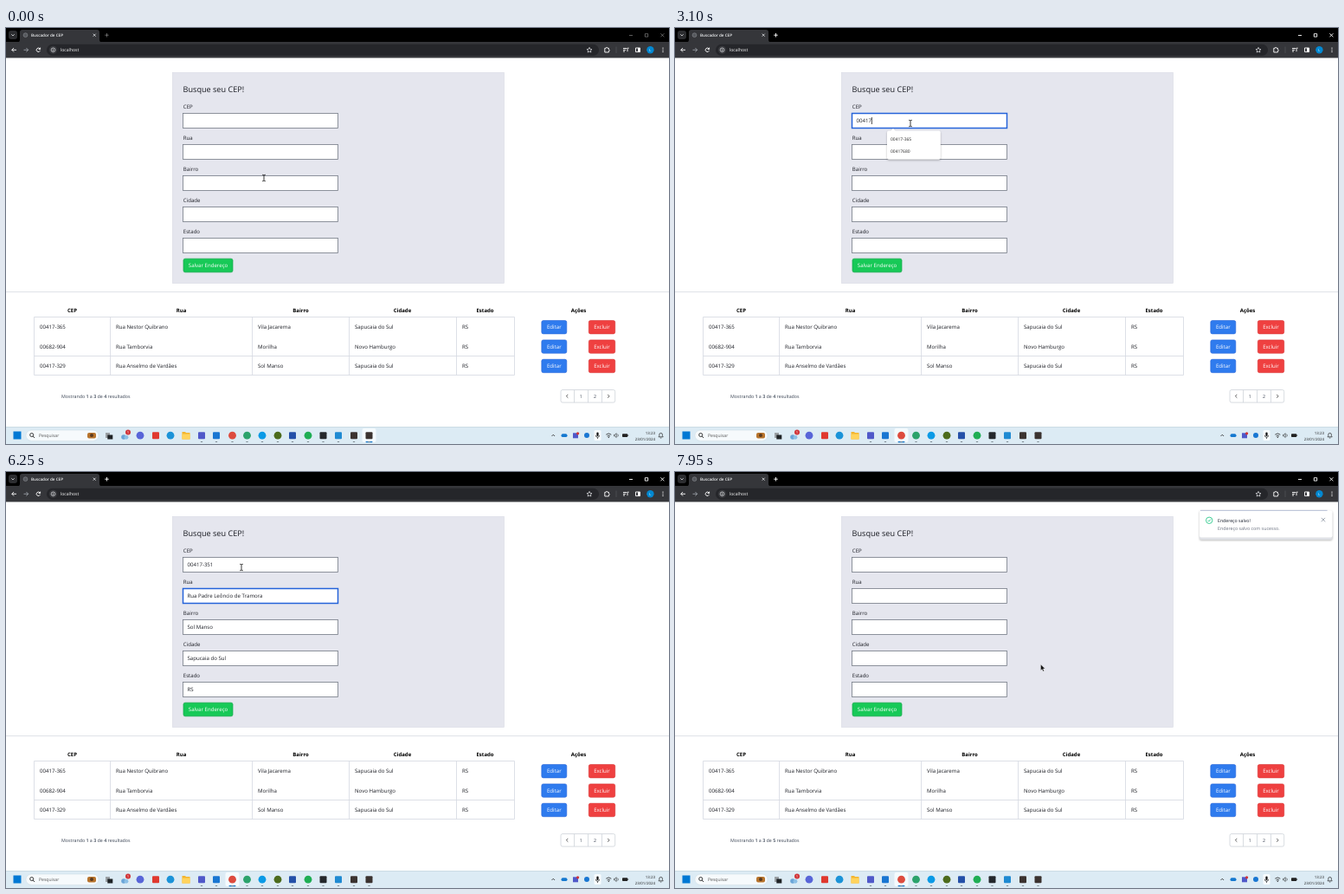
An HTML page for the animation above (8000 ms loop, 766 by 480 pixels).

```html
<!DOCTYPE html>
<html lang="pt-BR">
<head>
<meta charset="utf-8">
<title>Buscador de CEP</title>
<style>
html, body { margin: 0; width: 100%; height: 100%; overflow: hidden; background: #fff; }
svg { display: block; width: 766px; height: 480px; }
text { font-family: "Open Sans", "Noto Sans", sans-serif; text-rendering: geometricPrecision; white-space: pre; }
#popup, #toast { filter: drop-shadow(0 1px 1px #0004); }
</style>
</head>
<body>
<svg id="stage" viewBox="0 0 766 480" xmlns="http://www.w3.org/2000/svg"></svg>
<script>
const DURATION = 8000;
const stage = document.getElementById('stage');

// Markup helpers
const text = (x, y, size, str, fill = '#1b1d24', more = '') =>
  `<text x="${x}" y="${y}" font-size="${size}" fill="${fill}" ${more}>${str}</text>`;
const rect = (x, y, w, h, fill, more = '') =>
  `<rect x="${x}" y="${y}" width="${w}" height="${h}" fill="${fill}" ${more}/>`;
const circle = (x, y, r, fill, more = '') => `<circle cx="${x}" cy="${y}" r="${r}" fill="${fill}" ${more}/>`;
const line = (d, color, width = 0.8, more = '') =>
  `<path d="${d}" fill="none" stroke="${color}" stroke-width="${width}" ${more}/>`;
const middle = 'text-anchor="middle"';
const end = 'text-anchor="end"';

function browserBar() {
  const ink = '#e8eaed';
  return rect(0, 0, 766, 17, '#000') + rect(0, 16, 766, 18.5, '#35363a') +
    rect(3, 3, 10, 10, '#2c2d30', 'rx="3"') + line('M6.3 7.3l1.7 1.7 1.7-1.7', ink) +
    '<path d="M13 16.5q3 0 3-3V5q0-3 3-3h86q3 0 3 3v8.5q0 3 3 3z" fill="#35363a"/>' +
    circle(22.5, 8.2, 2.4, '#55585d', 'stroke="#8a8d92" stroke-width=".6"') +
    text(29, 10, 4.6, 'Buscador de CEP', '#f1f3f4', 'font-weight="600"') +
    line('M100.7 6.7l3 3m0-3l-3 3', ink) +
    `<g id="controls">${line('M114.2 8.2h4.6m-2.3-2.3v4.6', '#fff', 0.9)}` +
    line('M720 8.5h4M738.3 6.7h3.4v3.4h-3.4zM756.4 6.3l4 4m0-4l-4 4', '#fff', 0.9) + '</g>' +
    line('M12 25.3H6.8m2.3-2.3l-2.3 2.3 2.3 2.3', '#fff', 0.9) +
    line('M20.5 25.3h5.2m-2.3-2.3l2.3 2.3-2.3 2.3', '#9aa0a6', 0.9) +
    line('M39.3 24.2a2.2 2.2 0 1 0 .1 2M39.6 22.6v2h-2', '#fff', 0.9) +
    rect(47, 18.8, 638, 13.2, '#25262a', 'rx="6.6"') + circle(54.5, 25.3, 4.6, '#3a3b3f') +
    circle(54.5, 25.3, 2.3, 'none', `stroke="${ink}" stroke-width=".7"`) + line('M54.5 24.9v1.6m0-2.6v.5', ink) +
    text(63, 27.2, 5.1, 'localhost', '#fff') +
    line('M674 22.4l.9 2 2.1.2-1.6 1.4.5 2.1-1.9-1.1-1.9 1.1.5-2.1-1.6-1.4 2.1-.2z', ink, 0.7) +
    line('M691.8 23.3h1.4a.9.9 0 0 1 1.8 0h1.4v1.6a.9.9 0 0 1 0 1.8v1.3h-4.6z', '#fff', 0.9) +
    line('M705 21.5v7.5', '#55575c', 0.7) +
    line('M713 23.5h4.2M713 25.3h3M713 27h2M718 27.2v-4h1.6', '#fff', 0.9) +
    line('M727.5 23h5v4.6h-5z', '#fff', 0.9) + rect(730, 23, 2.5, 4.6, '#fff') +
    circle(744.4, 25.3, 4.2, '#0288d1') + text(744.4, 27, 4.2, 'L', '#fff', middle) +
    [23.2, 25.3, 27.4].map(y => circle(759, y, 0.65, '#fff')).join('');
}

const fieldY = i => 98.5 + 36 * i;
const FIELD = { x: 204.5, w: 179, h: 17 };

function form() {
  const labels = ['CEP', 'Rua', 'Bairro', 'Cidade', 'Estado'];
  return rect(192.3, 51.5, 383.2, 243, '#e5e6ee', 'stroke="#d9dae4" stroke-width=".6"') +
    text(204.6, 74, 9.1, 'Busque seu CEP!') +
    labels.map((label, i) => text(204.8, 93.2 + 36 * i, 6.1, label) +
      rect(FIELD.x, fieldY(i), FIELD.w, FIELD.h, '#fff', 'class="field"') +
      text(209.5, 109.3 + 36 * i, 6.1, '', '#1b1d24', 'class="value"')).join('') +
    rect(205, 266.2, 57, 15.6, '#17c957', 'rx="2" stroke="#12a548" stroke-width=".7"') +
    text(233.5, 276.2, 6.1, 'Salvar Endereço', '#fff', middle);
}

function button(x, y, w, label, fill, edge) {
  return rect(x, y, w, 15.4, fill, `rx="2" stroke="${edge}" stroke-width=".6"`) +
    text(x + w / 2, y + 9.9, 6.1, label, '#fff', middle);
}

function table() {
  const heads = { CEP: 76.5, Rua: 202.5, Bairro: 340.5, Cidade: 458, Estado: 553.5, Ações: 661.5 };
  const columns = [39, 127, 291, 403, 527];
  const rows = [
    ['00417-365', 'Rua Nestor Quibrano', 'Vila Jacarema', 'Sapucaia do Sul', 'RS'],
    ['00682-904', 'Rua Tamborvia', 'Morilha', 'Novo Hamburgo', 'RS'],
    ['00417-329', 'Rua Anselmo de Vardães', 'Sol Manso', 'Sapucaia do Sul', 'RS'],
  ];
  const bold = n => `<tspan font-weight="600">${n}</tspan>`;
  return line('M0 304.5H766', '#d9dbe2') +
    Object.entries(heads).map(([h, x]) => text(x, 328, 6, h, '#000', middle + ' font-weight="700"')).join('') +
    line('M32.5 333.5h555v67h-555zM120.5 333.5v67M284.5 333.5v67M396.5 333.5v67M520.5 333.5v67M32.5 378.5h555', '#d5d9e1') +
    rows.map((row, r) => {
      const y = 337.5 + 22.4 * r;
      return row.map((cell, c) => text(columns[c], y + 9.9, 6.1, cell)).join('') +
        button(618.8, y, 29, 'Editar', '#2f7bee', '#2563d8') + button(673.3, y, 30.4, 'Excluir', '#ef4040', '#d93434');
    }).join('') +
    text(64, 426.8, 5.3, `Mostrando ${bold(1)} a ${bold(3)} de <tspan id="total" font-weight="600">4</tspan> resultados`, '#374151') +
    rect(641, 417.5, 62.7, 14.6, '#fff', 'rx="2" stroke="#cfd3da" stroke-width=".8"') +
    line('M656.5 417.5v14.6M672.5 417.5v14.6M688.5 417.5v14.6', '#cfd3da') +
    line('M649.3 422.9l-1.9 1.9 1.9 1.9M695.2 422.9l1.9 1.9-1.9 1.9', '#333') +
    text(664.3, 426.8, 5.3, '1', '#374151', middle) + text(680.5, 426.8, 5.3, '2', '#374151', middle);
}

function taskbar() {
  const round = [[155, '#5865d8'], [190, '#1b93d8'], [261.5, '#dd4b3e'], [278.5, '#2ba36c'], [296, '#0a9ae6'],
    [314, '#4c6b1c'], [349, '#1fae54']];
  const square = [[173, '#e0392f'], [226, '#5059c9'], [243, '#1976d2'], [331, '#2450a8'], [366.5, '#24282c'],
    [384, '#1f8ad2'], [402, '#3b3330'], [419.5, '#3b3330']];
  const running = [226, 243, 261.5, 278.5, 296, 314, 331, 349, 366.5, 384, 402, 419.5];
  return rect(0, 460, 766, 20, '#dcebf4') + rect(0, 460, 766, 0.7, '#c6d6df') +
    rect(8.5, 465.5, 9, 9, '#0078d4') +
    rect(23, 464, 84, 12.4, '#f6fafc', 'rx="6.2" stroke="#cbd9e1" stroke-width=".5"') +
    circle(29.7, 469.5, 2, 'none', 'stroke="#222" stroke-width=".9"') + line('M31.2 471l1.9 2', '#222', 0.9) +
    text(38, 472.3, 5.1, 'Pesquisar', '#555') +
    rect(94, 467, 10, 6.5, '#b8742c', 'rx="2"') + circle(99, 470, 2, '#5a3a20') +
    rect(115, 467, 5, 6, '#9aa0a4') + rect(117.3, 469.5, 6, 5, '#1f2326') +
    circle(136, 472, 2.8, '#6aa5d8') + circle(139, 472.3, 2.4, '#8cc0e6') +
    circle(141, 466.4, 3, '#d13438') + text(141, 468, 4.2, '1', '#fff', middle) +
    `<g id="active">${rect(-8, 462, 16, 16, '#f4fafd', 'rx="2"')}${rect(-4, 477, 8, 1.2, '#1174c8', 'rx=".6"')}</g>` +
    running.map(x => rect(x - 1.3, 477, 2.6, 0.9, '#7c8991', 'rx=".4"')).join('') +
    round.map(([x, c]) => circle(x, 470.2, 4.4, c)).join('') +
    square.map(([x, c]) => rect(x - 4, 466.2, 8, 8, c, 'rx="1"')).join('') +
    '<path d="M203.5 466h3.5l1 1h4.5v7.5h-9z" fill="#f3b52f"/>' + rect(203.5, 468.5, 9, 6, '#ffd35c') +
    tray();
}

function tray() {
  const ink = '#222';
  return line('M630.5 471l1.8-1.8 1.8 1.8', ink) +
    rect(641.5, 468.3, 7, 3.8, '#1478cf', 'rx="1.9"') + rect(655, 467.3, 6, 6, '#5059c9') + circle(660.6, 467.8, 1.6, '#d13438') +
    circle(671, 470, 3, '#1976d2') + rect(679.5, 464, 8, 12, '#f8fcfe', 'rx="1.5"') +
    rect(682.4, 466.4, 2.2, 4.6, '#111', 'rx="1.1"') + line('M681.3 470a2.2 2.2 0 0 0 4.4 0M683.5 472.2v1.8', ink, 0.7) +
    line('M693.3 469.2q3-2.6 6 0M694.6 471q1.7-1.5 3.4 0', ink) + circle(696.3, 472.3, 0.7, ink) +
    line('M702.6 469.2h1l1.6-1.5v4.8l-1.6-1.5h-1zM706.7 468.6q1.3 1.5 0 3', ink, 0.6) +
    rect(712, 468.2, 6.2, 3.8, ink, 'rx=".8"') + rect(718.4, 469.3, 0.7, 1.6, ink) +
    text(750, 468.7, 4.4, '13:23', ink, end) + text(750, 475.6, 4.4, '23/01/2024', ink, end) +
    line('M754 471.8h5.2l-.8-1.2v-1.4a1.8 1.8 0 0 0-3.6 0v1.4zM755.9 473h1.4', ink, 0.7);
}

function overlays() {
  return '<g id="popup">' +
    '<path d="M249 119l3-3 3 3z" fill="#fff"/>' + rect(245, 118.6, 61.8, 62, '#fff', 'id="sheet" rx="2"') +
    [0, 1, 2, 3].map(i => text(249, 130 + 14.4 * i, 4.95, '', '#222', 'class="option"')).join('') + '</g>' +
    '<g id="toast">' + rect(606, 45, 153.5, 33, '#dfe1e6', 'rx="2"') + rect(606, 44.3, 153.5, 31.2, '#fff', 'rx="2"') +
    rect(607, 43.9, 151, 1, '#b9c0d6', 'id="progress"') +
    circle(617.2, 55.8, 3.7, 'none', 'stroke="#2dc98c" stroke-width=".9"') + line('M615.5 55.9l1.2 1.2 2.2-2.6', '#2dc98c', 0.9) +
    text(627, 57.8, 5.2, 'Endereço salvo!', '#111827', 'font-weight="500"') +
    text(627, 67.4, 5.3, 'Endereço salvo com sucesso.', '#6b7280') +
    line('M746.8 52.9l4.4 4.4m0-4.4l-4.4 4.4', '#8b93a1') + '</g>' +
    rect(0, 0, 0.7, 8, '#000', 'id="caret"') +
    '<g id="cursor">' +
    line('M-1.8-3.7q1.8 0 1.8 .9v5.6q0 .9-1.8 .9M1.8-3.7Q0-3.7 0-2.8M0 2.8q0 .9 1.8 .9', '#222', 0.9) +
    '<path d="M-.4 0q.8-.8 1.5 0v3l3 .7q.8.3.6 1.3l-.6 3.5h-3.4l-2.6-3q0-1 1.5-.3z" fill="#fff" stroke="#111" stroke-width=".8"/>' +
    '<path d="M0 0v7l1.6-1.4 1.1 2.4 1.2-.5-1.1-2.4h2.2z" fill="#111" stroke="#fff" stroke-width=".35"/></g>';
}

stage.innerHTML = rect(0, 34, 766, 427, '#fff') + browserBar() + form() + table() + taskbar() + overlays();

// Timeline, in ms
const CLICK = 960, TAB = 5190, FILL = 5690, BLUR = 7380, SAVED = 7580;
const keyTimes = [2150, 2380, 2640, 2870, 3100, 3560, 4430, 4760];
const typedCep = '00417351';
const filled = ['00417-351', 'Rua Padre Leôncio de Tramora', 'Sol Manso', 'Sapucaia do Sul', 'RS'];
const history = ['00417-365', '00682-904', '09999872', '00417680'];
const caretSpans = [[CLICK, 1460], [1990, 4100], [4430, FILL], [6270, 6730], [7210, BLUR]];
const path = [[30, 298, 173], [400, 272, 110], [6710, 272, 110], [7060, 257, 288],
  [7200, 251, 278], [7740, 251, 278], [7950, 422.5, 222]];

const $ = id => document.getElementById(id);
const all = name => [...document.getElementsByClassName(name)];
const fields = all('field'), values = all('value'), options = all('option');
const pointers = [...$('cursor').children];
const show = (el, on) => el.setAttribute('visibility', on ? 'visible' : 'hidden');
const ramp = (t, from, to) => Math.min(1, Math.max(0, (t - from) / (to - from)));
const inside = (x, y, left, top, w, h) => x >= left && x <= left + w && y >= top && y <= top + h;

function cursorAt(t) {
  let [, x, y] = path[0];
  for (let i = 1; i < path.length; i++) {
    const k = ramp(t, path[i - 1][0], path[i][0]);
    const ease = k * k * (3 - 2 * k);
    x += (path[i][1] - path[i - 1][1]) * ease;
    y += (path[i][2] - path[i - 1][2]) * ease;
  }
  return [x, y];
}

function suggestions(typed) {
  if (!typed) return history;
  const [a, b, c, d] = history;
  // The list keeps its last two matches while it fades out
  const prefix = typed.slice(0, 5);
  return [a, b, d, c].filter(s => s.startsWith(prefix));
}

function draw(t) {
  const typed = typedCep.slice(0, keyTimes.filter(k => t >= k).length);
  const focus = t < CLICK || t >= BLUR ? -1 : t < TAB ? 0 : 1;
  const content = t >= SAVED ? [] : t >= FILL ? filled : [typed];

  fields.forEach((f, i) => {
    f.setAttribute('stroke', i === focus ? '#2563d9' : '#747a85');
    f.setAttribute('stroke-width', i === focus ? 1.5 : 0.8);
    values[i].textContent = content[i] || '';
  });

  const caretOn = focus >= 0 && caretSpans.some(([from, to]) => t >= from && t < to);
  show($('caret'), caretOn);
  if (caretOn) {
    const width = content[focus] ? values[focus].getComputedTextLength() : 0;
    $('caret').setAttribute('x', 209.5 + width);
    $('caret').setAttribute('y', fieldY(focus) + 4.5);
  }

  const list = suggestions(typed);
  options.forEach((o, i) => o.textContent = list[i] || '');
  $('sheet').setAttribute('height', 4.4 + 14.4 * list.length);
  $('popup').setAttribute('opacity', ramp(t, 1050, 1200) * (1 - ramp(t, 3560, 3740)));

  $('controls').setAttribute('opacity', t < CLICK ? 0.4 : 1);
  $('active').setAttribute('transform', `translate(${t < CLICK ? 419.5 : 261.5})`);
  $('total').textContent = t < SAVED ? 4 : 5;
  show($('toast'), t >= SAVED);
  $('progress').setAttribute('width', 151 - 5 * ramp(t, SAVED, DURATION));

  const [x, y] = cursorAt(t);
  const overField = fields.some((f, i) => inside(x, y, FIELD.x, fieldY(i), FIELD.w, FIELD.h));
  const kind = overField ? 0 : inside(x, y, 205, 266, 57, 16) ? 1 : 2;
  pointers.forEach((p, i) => show(p, i === kind));
  $('cursor').setAttribute('transform', `translate(${x} ${y})`);
}

const start = performance.now();
function tick() {
  draw((performance.now() - start) % DURATION);
  requestAnimationFrame(tick);
}
tick();
</script>
</body>
</html>
```
